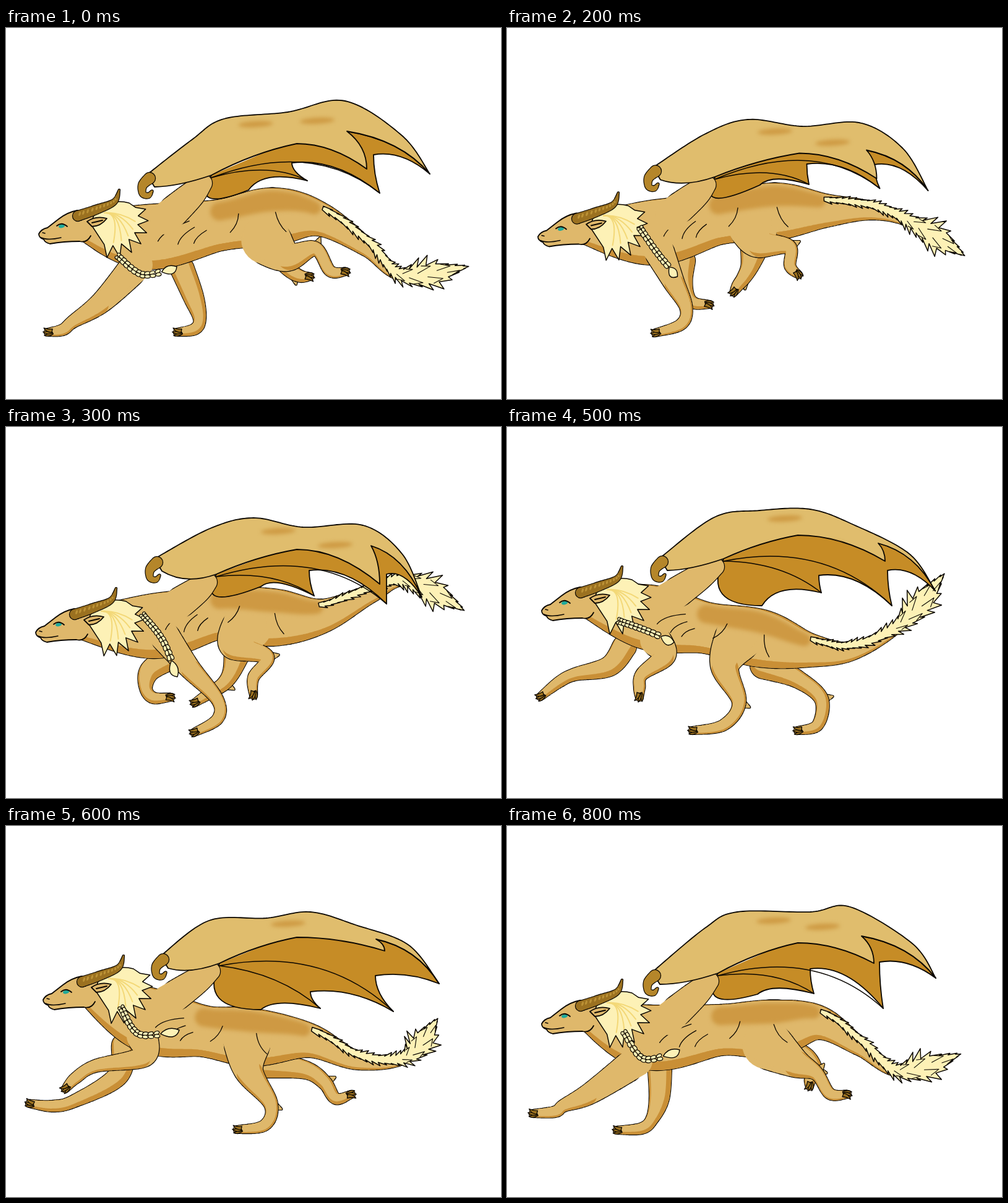
Recreate the animation shown at these times as an HTML page with a canvas. Size 800x600 px, loop 900 ms.

```html
<!DOCTYPE html>
<html lang="en">
<head>
<meta charset="utf-8">
<title>Running dragon</title>
<style>
html, body { margin: 0; width: 100%; height: 100%; overflow: hidden; background: #fff; }
canvas { display: block; width: 100vw; height: 100vh; }
</style>
</head>
<body>
<canvas id="stage" width="800" height="600"></canvas>
<script>
const ctx = document.getElementById('stage').getContext('2d');
const SKIN = '#dfb86b', WING = '#e0bd6d', DARK = '#c68c26', SHADE = '#c98f36';
const CREAM = '#fdf1b6', HORN = '#9b7120', GOLD = '#b5862a', INK = '#0a0600';

// Body thickness, shared by every pose.
const SPINE_R = [24, 52, 41, 46, 27, 14, 5, 2];
const FORE_R = [25, 17, 10, 9, 6], HIND_R = [40, 23, 11, 9, 6];
const FAR_FORE_R = [19, 16, 10, 9, 6], FAR_HIND_R = [22, 14, 11, 9, 6];

// Joints of each pose as x,y pairs.
// spine: chest, waist, rump, tail. Legs: root, knee, ankle, ball, toe.
// edge: upper wing rim. fold: elbow, lower rim, panel point, finger joint.
// trail: body, first tip, notch, second tip, notch.
const stretch = {
  head: [53,333], braid: [182,370,222,399,276,386],
  spine: [228,338,345,319,432,305,506,309,583,355,640,403,748,387],
  nearFore: [212,383,155,443,108,475,92,488,68,492],
  farFore: [285,390,303,435,313,470,305,487,277,492],
  nearHind: [420,342,455,370,500,357,524,393,549,394],
  farHind: [440,350,450,380,465,396,478,402,491,402],
  edge: [228,237,300,181,352,147,455,136,548,118,640,174,685,236],
  fold: [332,238,470,187,583,228,551,167],
  trail: [392,262,487,247,462,218,604,267,594,205]
};
const plant = {
  head: [52,343], braid: [210,345,236,387,274,400],
  spine: [232,340,338,316,435,286,515,285,590,322,660,385,738,441],
  nearFore: [235,378,242,430,238,465,220,487,176,492],
  farFore: [308,378,335,418,358,442,368,452,388,457],
  nearHind: [405,318,445,343,490,336,515,365,542,364],
  farHind: [425,350,420,375,414,392,416,403,428,409],
  edge: [232,238,308,180,378,149,475,156,565,148,640,185,689,251],
  fold: [333,243,475,207,591,233,572,203],
  trail: [405,250,478,233,479,208,590,233,572,204]
};
const gather = {
  head: [48,332], braid: [222,305,254,346,277,404],
  spine: [240,322,345,302,430,308,510,306,590,270,650,252,740,298],
  nearFore: [250,330,295,388,341,440,342,472,304,494],
  farFore: [262,375,232,395,226,422,238,438,266,437],
  nearHind: [390,322,369,353,422,372,400,405,400,434],
  farHind: [375,360,365,395,352,415,330,430,305,446],
  edge: [240,213,330,164,400,147,480,162,577,159,640,205,672,275],
  fold: [340,238,470,198,604,254,590,192],
  trail: [412,258,498,273,490,232,615,286,615,238]
};
const push = {
  head: [56,297], braid: [182,314,222,328,270,348],
  spine: [230,308,322,325,410,342,488,361,560,362,640,320,708,238],
  nearFore: [240,345,255,370,218,400,214,422,214,437],
  farFore: [190,355,165,387,110,400,85,412,54,436],
  nearHind: [378,335,352,385,375,445,350,482,300,491],
  farHind: [415,385,470,408,508,440,502,482,470,491],
  edge: [247,212,335,146,408,135,490,133,560,158,650,205,692,265],
  fold: [350,213,470,175,611,217,600,188],
  trail: [412,289,508,268,504,240,622,289,615,232]
};
const leap = {
  head: [60,281], braid: [187,295,216,337,280,330],
  spine: [230,314,320,332,400,342,490,347,570,380,650,376,699,312],
  nearFore: [220,340,222,373,145,388,112,408,96,425],
  farFore: [190,355,180,405,110,445,75,453,38,449],
  nearHind: [390,343,392,395,428,450,418,484,374,491],
  farHind: [420,385,485,395,515,415,533,441,558,434],
  edge: [250,210,328,153,420,149,492,139,565,160,650,192,700,255],
  fold: [345,222,470,180,612,202,598,183],
  trail: [412,297,508,295,492,268,626,300,597,242]
};
const reach = {
  head: [56,320], braid: [190,335,222,377,279,362],
  spine: [230,342,345,330,428,328,503,318,570,357,635,400,734,370],
  nearFore: [210,380,135,432,92,452,78,462,42,465],
  farFore: [247,395,246,440,235,473,218,489,178,492],
  nearHind: [420,353,465,383,500,400,522,433,550,434],
  farHind: [455,365,485,375,498,395,490,410,489,421],
  edge: [235,236,320,165,372,139,490,139,555,131,655,190,693,246],
  fold: [341,238,470,189,593,222,573,178],
  trail: [405,272,496,271,490,231,608,295,602,220]
};

const halfway = (a, b) => Object.fromEntries(
  Object.keys(a).map(k => [k, a[k].map((v, i) => (v + b[k][i]) / 2)]));
const cycle = [stretch, plant, halfway(plant, gather), gather, halfway(gather, push),
  push, leap, halfway(leap, reach), reach];

const lerp = (a, b, t) => a + (b - a) * t;

// Flat x,y list to joints, with a radius when given.
const joints = (flat, radii = []) => Array.from({ length: flat.length / 2 },
  (_, i) => [flat[2 * i], flat[2 * i + 1], radii[i] ?? 0]);

// Point [x, y, r] of the spline through the joints; t counts joints.
function spline(keys, t) {
  const i = Math.min(keys.length - 2, Math.floor(t)), f = t - i;
  const key = j => keys[Math.max(0, Math.min(keys.length - 1, j))];
  const [a, b, c, d] = [key(i - 1), key(i), key(i + 1), key(i + 2)];
  return b.map((v, k) => v + f / 2 * (c[k] - a[k] + f * (2 * a[k] - 5 * v + 4 * c[k] - d[k]
    + f * (3 * (v - c[k]) + d[k] - a[k]))));
}

function sample(keys, from = 0, to = keys.length - 1, n = 120) {
  return Array.from({ length: n + 1 }, (_, i) => spline(keys, lerp(from, to, i / n)));
}

// Point beside the spline; side 1 is the lower edge, -1 the upper.
function beside(keys, t, side, width) {
  const [x, y, r] = spline(keys, t);
  const [ax, ay] = spline(keys, Math.max(0, t - 0.05));
  const [bx, by] = spline(keys, Math.min(keys.length - 1, t + 0.05));
  const d = Math.hypot(bx - ax, by - ay) || 1, w = side * (width ?? r);
  return [x - (by - ay) / d * w, y + (bx - ax) / d * w];
}

function paint(path, fill, width = 1.8) {
  if (fill) {
    ctx.fillStyle = fill;
    ctx.fill(path);
  }
  ctx.strokeStyle = INK;
  ctx.lineWidth = width;
  ctx.stroke(path);
}

// Row of discs; inset shrinks them toward the upper left.
function discs(row, color, grow = 0, inset = 0) {
  ctx.fillStyle = color;
  ctx.beginPath();
  for (const [x, y, r] of row) {
    const size = Math.max(0.3, r * (1 - inset) + grow);
    const cx = x - r * inset * 0.45, cy = y - r * inset * 0.89;
    ctx.moveTo(cx + size, cy);
    ctx.arc(cx, cy, size, 0, 7);
  }
  ctx.fill();
}

// Outlined tube with a shaded lower edge; its root can stay open.
function tube(row, color, inset, open = 0) {
  discs(row.slice(row.length * open), INK, 1.2);
  discs(row, color);
  if (!inset) return;
  discs(row.slice(row.length * open * 4), SHADE);
  discs(row, color, 0, inset);
}

function blurred(draw) {
  ctx.save();
  ctx.filter = 'blur(3px)';
  ctx.globalAlpha = 0.75;
  draw();
  ctx.restore();
}

function claws(ball, toe) {
  const turn = Math.atan2(toe[1] - ball[1], toe[0] - ball[0]);
  for (const side of [-1, 0, 1]) {
    ctx.save();
    ctx.translate(toe[0], toe[1]);
    ctx.rotate(turn + side * 0.35);
    ctx.translate(0, side * 3.5);
    const claw = new Path2D('M-6 -3 Q4 -4 8 2 Q0 1 -6 3 Z');
    paint(claw, HORN, 1.3);
    ctx.restore();
  }
}

function leg(flat, radii, far, hind) {
  const keys = joints(flat, radii);
  if (hind) {
    // Spur points away from the bend of the hock.
    const [knee, hock, ball] = keys.slice(1, 4);
    const dx = hock[0] - (knee[0] + ball[0]) / 2, dy = hock[1] - (knee[1] + ball[1]) / 2;
    const reach = 19 / (Math.hypot(dx, dy) || 1);
    tube(sample([[hock[0], hock[1], 9], [hock[0] + dx * reach, hock[1] + dy * reach, 1]]), SKIN);
  }
  tube(sample(keys), SKIN, far ? 0.3 : 0.16, far ? 0 : 0.07);
  claws(keys[3], keys[4]);
}

function fur(spine) {
  const path = new Path2D(), n = 24;
  const width = u => (5 + 8 * u + 13 * Math.exp(-(((u - 0.8) / 0.13) ** 2)))
    * Math.min(1, (1 - u) * 6);
  const at = (u, side) => {
    u = Math.min(1, u);
    const t = 4 + 3 * u, lift = -0.7 * spline(spine, t)[2];
    return beside(spine, t, 1, lift + side * width(u));
  };
  const spike = (i, side) => {
    const u = i / n, long = 1.05 + 0.25 * Math.sin(i * 5 + side);
    return [at(u, side * 0.62), at(u + 0.055, side * long)];
  };
  for (let i = 0; i < n; i++) for (const p of spike(i, -1)) path.lineTo(...p);
  path.lineTo(...at(1, 0));
  for (let i = n - 1; i >= 0; i--) for (const p of spike(i, 1).reverse()) path.lineTo(...p);
  path.closePath();
  paint(path, CREAM, 1.5);
  for (let i = 15; i < 22; i++) {
    const side = i % 2 ? 0.4 : -0.4, tuft = new Path2D();
    tuft.moveTo(...at(i / n, side * 0.4));
    tuft.lineTo(...at(i / n + 0.06, side * 1.3));
    tuft.lineTo(...at(i / n + 0.02, side * 1.6));
    paint(tuft, null, 1.1);
  }
}

function folds(spine) {
  const marks = [[3.05, -0.15, 3.25, 0.6], [2.35, -0.3, 2.15, 0.35],
    [1.4, 0.35, 1.65, -0.1], [1.6, 0.45, 1.8, 0.1], [1.15, 0.15, 1.6, -0.35]];
  for (const [t0, s0, t1, s1] of marks) {
    const line = new Path2D();
    line.moveTo(...beside(spine, t0, s0));
    line.quadraticCurveTo(...beside(spine, lerp(t0, t1, 0.2), lerp(s0, s1, 0.6)),
      ...beside(spine, t1, s1));
    paint(line, null, 1.3);
  }
}

function wing({ edge, fold, trail, spine }) {
  const rim = joints(edge), [elbow, low, panel, joint] = joints(fold);
  const [root, tip1, notch1, tip2, notch2] = joints(trail);
  const wrist = rim[0], tip3 = rim[6];
  const outer = path => path.quadraticCurveTo(lerp(joint[0], tip3[0], 0.65),
    lerp(joint[1], tip3[1], 0.2), joint[0], joint[1]);

  const under = new Path2D();
  under.moveTo(elbow[0], elbow[1]);
  under.quadraticCurveTo(elbow[0] - 35, Math.max(root[1], elbow[1] + 62), root[0], root[1]);
  under.quadraticCurveTo(lerp(root[0], tip1[0], 0.25), Math.min(root[1], tip1[1]) - 18,
    tip1[0], tip1[1]);
  for (const [from, notch, to] of [[tip1, notch1, tip2], [tip2, notch2, tip3]]) {
    under.quadraticCurveTo(notch[0], lerp(from[1], notch[1], 0.5), notch[0], notch[1]);
    under.quadraticCurveTo(lerp(notch[0], to[0], 0.5), notch[1] - 8, to[0], to[1]);
  }
  outer(under);
  under.lineTo(low[0], low[1] - 8);
  paint(under, DARK);

  for (const [tip, bow] of [[tip1, 28], [tip2, 75]]) {
    const bone = new Path2D();
    bone.moveTo(elbow[0], elbow[1] + 4);
    bone.quadraticCurveTo(lerp(elbow[0], tip[0], 0.6), lerp(elbow[1], tip[1], 0.6) - bow,
      tip[0], tip[1]);
    paint(bone, null, 1.5);
  }

  const arm = [[spine[0] + 30, spine[1] - 30, 26],
    [lerp(spine[0] + 30, elbow[0], 0.55), lerp(spine[1] - 38, elbow[1] + 14, 0.6), 21],
    [elbow[0] - 13, elbow[1] + 13, 14]];
  tube(sample(arm), SKIN, 0, 0.2);

  const top = new Path2D();
  for (const [x, y] of sample(rim)) top.lineTo(x, y);
  outer(top);
  top.quadraticCurveTo(panel[0], lerp(joint[1], panel[1], 0.4), panel[0], panel[1]);
  top.quadraticCurveTo(lerp(panel[0], low[0], 0.5), low[1], low[0], low[1]);
  top.quadraticCurveTo(lerp(low[0], elbow[0], 0.5), lerp(low[1], elbow[1], 0.28),
    elbow[0], elbow[1]);
  top.quadraticCurveTo((elbow[0] + wrist[0]) / 2, elbow[1] + 18, wrist[0] + 12, wrist[1] + 20);
  top.closePath();
  paint(top, WING);

  // Soft shadows under the rim.
  const spots = [[(rim[2][0] + rim[3][0]) / 2, (rim[2][1] + rim[3][1]) / 2 + 14],
    [rim[4][0] - 45, rim[4][1] + 32]];
  ctx.save();
  ctx.clip(top);
  blurred(() => {
    ctx.fillStyle = SHADE;
    for (const [x, y] of spots) {
      ctx.beginPath();
      ctx.ellipse(x, y, 28, 5, -0.05, 0, 7);
      ctx.fill();
    }
  });
  ctx.restore();

  const hook = [[4, 6, 9], [-7, 17, 7], [-7, 31, 5], [2, 34, 4], [8, 27, 1.5]]
    .map(([x, y, r]) => [wrist[0] + x, wrist[1] + y, r]);
  tube(sample(hook), GOLD);
}

function mane() {
  const path = new Path2D('M84 -16 L92 -38 Q118 -58 146 -50');
  for (let i = 0; i <= 14; i++) {
    const angle = -0.45 + i * 0.165;
    const far = i % 2 ? 56 + 7 * Math.sin(i * 3) : 43;
    path.lineTo(118 + far * Math.cos(angle), -24 + far * Math.sin(angle));
  }
  path.closePath();
  paint(path, CREAM, 1.5);
  ctx.strokeStyle = '#f3d877';
  ctx.lineWidth = 2;
  for (let i = 0; i < 5; i++) {
    const angle = 0.1 + i * 0.35;
    ctx.beginPath();
    ctx.moveTo(106, -34);
    ctx.quadraticCurveTo(130, -36, 118 + 38 * Math.cos(angle), -24 + 38 * Math.sin(angle));
    ctx.stroke();
  }
}

function head() {
  const face = new Path2D('M84 3 Q78 15 66 12 Q40 12 18 16 Q10 14 8 9 Q0 6 0 0 Q4 -8 14 -10'
    + ' L32 -24 Q46 -35 62 -38 L80 -36');
  paint(face, SKIN);
  paint(new Path2D('M4 6 Q14 11 36 6 M6 -2 L10 -1'), null, 1.5);
  ctx.fillStyle = '#1fa99a';
  ctx.beginPath();
  ctx.ellipse(37, -12.5, 5, 2.7, -0.2, 0, 7);
  ctx.fill();
  paint(new Path2D('M29 -13 Q37 -20 46 -12'));
  paint(new Path2D('M78 -20 Q92 -30 110 -25 Q100 -12 86 -12 Z M86 -18 L103 -22'), SKIN);
  const horn = [[63, -29, 8], [95, -40, 7], [122, -52, 4.5], [130, -71, 1]];
  tube(sample(horn), HORN);
  ctx.fillStyle = '#bd9336';
  for (let t = 0.15; t < 2.2; t += 0.2) {
    const [x, y, r] = spline(horn, t);
    ctx.beginPath();
    ctx.ellipse(x, y - r * 0.3, 1.6, r * 0.45, 0.3, 0, 7);
    ctx.fill();
  }
}

function braid(flat) {
  const keys = joints(flat, [5, 5, 5]);
  const beads = Math.round(Math.hypot(flat[4] - flat[0], flat[5] - flat[1]) / 8.5);
  for (let i = 0; i < beads; i++) for (const side of [-1, 1]) {
    const t = i / beads * 1.55;
    const [x, y] = beside(keys, t, side, 2.6), [ax, ay] = spline(keys, t + 0.1);
    const bead = new Path2D();
    bead.ellipse(x, y, 4.6, 2.8, Math.atan2(ay - y, ax - x) + side * 0.5, 0, 7);
    paint(bead, CREAM, 1.2);
  }
  const tuft = new Path2D();
  tuft.moveTo(...spline(keys, 1.5).slice(0, 2));
  tuft.quadraticCurveTo(...beside(keys, 1.7, -1, 11), ...spline(keys, 2).slice(0, 2));
  tuft.quadraticCurveTo(...beside(keys, 1.8, 1, 17), ...spline(keys, 1.5).slice(0, 2));
  paint(tuft, CREAM, 1.4);
}

function draw(pose) {
  ctx.fillStyle = '#fff';
  ctx.fillRect(0, 0, 800, 600);
  ctx.lineJoin = ctx.lineCap = 'round';
  const [hx, hy] = pose.head;
  const spine = joints([hx + 78, hy - 12, ...pose.spine], SPINE_R);
  leg(pose.farFore, FAR_FORE_R, true, false);
  leg(pose.farHind, FAR_HIND_R, true, true);
  tube(sample(spine, 0, 6, 300), SKIN, 0.14);
  leg(pose.nearHind, HIND_R, false, true);
  leg(pose.nearFore, FORE_R, false, false);
  blurred(() => discs(sample(spine, 2, 3.9)
    .map(([x, y, r]) => [x, y - r * 0.55, r * 0.36]), SHADE));
  folds(spine);
  fur(spine);
  wing(pose);
  ctx.save();
  ctx.translate(hx, hy);
  mane();
  head();
  ctx.restore();
  braid(pose.braid);
}

let shown = -1;
function tick() {
  const i = Math.floor(performance.now() / 100) % cycle.length;
  if (i !== shown) draw(cycle[shown = i]);
  requestAnimationFrame(tick);
}
tick();
</script>
</body>
</html>
```
